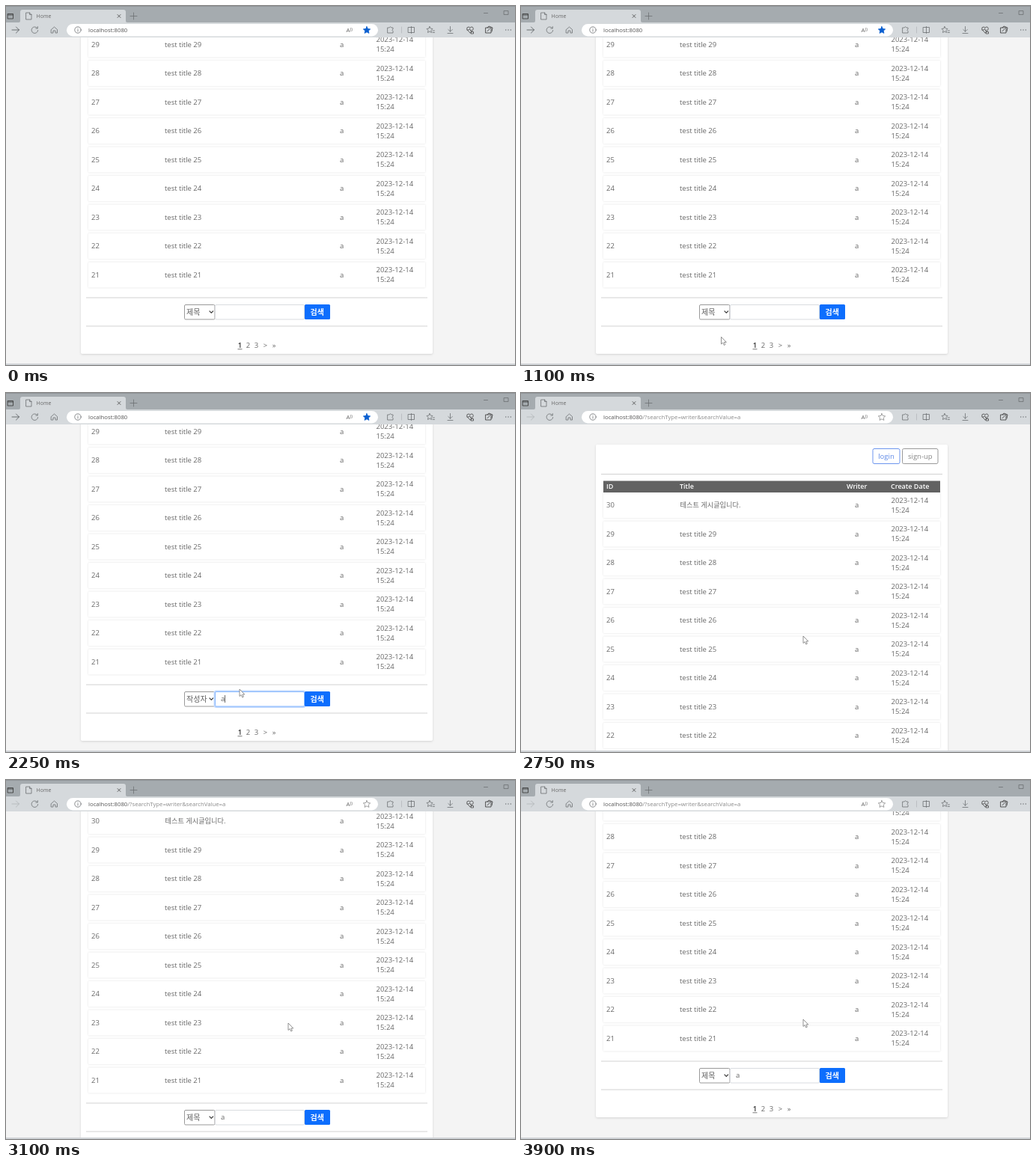
Recreate the animation shown at these times as an HTML page. Size 680x480 px, loop 4000 ms.

```html
<!DOCTYPE html>
<html lang="ko">
<head>
<meta charset="utf-8">
<title>Board search</title>
<style>
html, body { margin: 0; width: 100%; height: 100%; overflow: hidden; background: #f4f4f4; }
svg { display: block; }
text { font: 9.5px "Open Sans", "Noto Sans CJK KR", "Noto Sans CJK", sans-serif; fill: #686868; white-space: pre; }
.ko { font-size: 9.2px; }
.ui { font-size: 10px; fill: #5c5c5c; }
.head { font-size: 9px; font-weight: 600; fill: #fff; }
.url { font-size: 7.75px; fill: #8a8a8a; }
.rule { stroke: #d2d2d2; }
.card { fill: #fff; filter: drop-shadow(0 1px 1.5px rgba(0,0,0,.13)); }
.row { fill: #fff; filter: drop-shadow(0 .8px 1px rgba(0,0,0,.13)); }
.icon { fill: none; stroke: #6c7073; stroke-width: .8; stroke-linejoin: round; stroke-linecap: round; }
</style>
</head>
<body>
<svg id="stage" width="680" height="480" viewBox="0 0 680 480">
  <rect width="680" height="480" fill="#f4f4f4"/>
  <g id="page">
    <rect class="card" x="100" y="69" width="470" height="533" rx="2"/>
    <g fill="#fff">
      <rect x="470" y="74.5" width="36" height="20" rx="2" stroke="#6c95ee"/>
      <rect x="509.5" y="74.5" width="47.5" height="20" rx="2" stroke="#999"/>
    </g>
    <text x="488" y="87.5" text-anchor="middle" style="fill:#5b87e6">login</text>
    <text x="533.3" y="87.5" text-anchor="middle" style="fill:#858585">sign-up</text>
    <path class="rule" d="M107 108.5H563M107 527H563M107 565H563"/>
    <g id="rows"></g>
    <rect x="110" y="117.5" width="450" height="15.5" fill="#626262"/>
    <text class="head" x="114" y="128">ID</text>
    <text class="head" x="212" y="128">Title</text>
    <text class="head" x="435" y="128">Writer</text>
    <text class="head" x="494" y="128">Create Date</text>

    <rect x="238.5" y="536.5" width="40.5" height="19.5" rx="1.5" fill="#fff" stroke="#999"/>
    <text class="ui" id="kind" x="241" y="549.6"></text>
    <path class="icon" d="M272 545l2.3 2.3 2.3-2.3" style="stroke:#444;stroke-width:1.2"/>
    <rect id="glow" x="279" y="536" width="120" height="20.5" rx="2" fill="none" stroke="#c2d9fd" stroke-width="3"/>
    <rect id="box" x="279.5" y="536.5" width="119" height="19.5" rx="1.5" fill="#fff"/>
    <text id="value" x="287" y="549.4"></text>
    <path id="caret" d="M0 541V551" stroke="#444" stroke-width=".8"/>
    <rect x="399" y="536" width="34" height="20" rx="1.5" fill="#0d6efd"/>
    <text class="ui" x="415.8" y="549.6" text-anchor="middle" style="fill:#fff;font-weight:700">검색</text>
    <g text-anchor="middle">
      <text x="312.5" y="594.4" style="font-weight:600;fill:#333">1</text>
      <path d="M309.5 595.8H315.5" stroke="#555" stroke-width=".8"/>
      <text x="323.5" y="594.4">2</text>
      <text x="334.5" y="594.4">3</text>
      <text x="346.5" y="594.4">&gt;</text>
      <text x="358" y="594.4">»</text>
    </g>
  </g>

  <rect width="680" height="22" fill="#a5abaf"/>
  <rect width="680" height=".8" fill="#8b9094"/>
  <rect y="22" width="680" height="20" fill="#d5d9dc"/>
  <path d="M17 22Q19 22 19 20V8Q19 5 22 5H157Q160 5 160 8V20Q160 22 162 22Z" fill="#d5d9dc"/>
  <rect x="81" y="24" width="416" height="16.5" rx="8.2" fill="#fff"/>
  <text x="40.5" y="15.8" style="font-size:7px">Home</text>
  <text class="url" x="110" y="34.8"><tspan fill="#555">localhost:8080</tspan><tspan id="query"></tspan></text>
  <text x="454.5" y="35" style="font-size:8px">A<tspan dy="-2" style="font-size:6px">))</tspan></text>
  <g class="icon">
    <path d="M2.5 10.5H9.5V17H2.5ZM2.5 12H9.5" style="stroke:#333"/>
    <path d="M27 9H31.5L34 11.5V18H27ZM31.5 9V11.5H34"/>
    <path d="M149 11.5l4 4M153 11.5l-4 4" style="stroke:#444"/>
    <path d="M166 13.5h9M170.5 9v9M638.5 9.5h5M665.5 6.5h5.5v5h-5.5Z"/>
    <path id="forward" d="M8 32H17.5M13.5 28l4 4-4 4"/>
    <path d="M41.8 29.5A4.3 4.3 0 1 0 42.7 32.5M42.3 27.5V30H39.8"/>
    <path d="M60.5 31.5L64.5 28L68.5 31.5V36H66V33H63V36H60.5Z"/>
    <circle cx="96" cy="32" r="4.2"/><path d="M96 31.5V34M96 29.9V30"/>
    <path id="star" d="M482 27.5L483.4 30.5 486.7 30.9 484.3 33.1 484.9 36.4 482 34.8 479.1 36.4 479.7 33.1 477.3 30.9 480.6 30.5Z"/>
    <path d="M510 29H512Q513.5 26.5 515 29H517V31Q514.5 32 517 33.5V36H510Z"/>
    <path d="M528.5 28V36" style="stroke:#b4b8bb"/>
    <path d="M537.5 28.5H545.5V35.5H537.5ZM541.5 27.5V36.5"/>
    <path d="M566 27.5L567.3 30 570 30.5 568 32.5 568.4 35.5 566 34 563.5 35.5 564 32.5 562 30.5 564.7 30ZM570 33h2.5M570 35.5h2.5"/>
    <path d="M593.5 27.5V34M590.8 31.5l2.7 2.7 2.7-2.7M590 36.5h7"/>
    <path d="M620 36L615.8 31.5Q615 28 618 28 619.5 28 620 29.5 620.5 28 622 28 625 28 624 31.5ZM616 32h2.5l1-1.5 1.5 3 1-1.5M621.5 34.5h3v2.5h-3Z" style="stroke:#444"/>
    <path d="M641 29H648V36H641ZM643 29L645 27 650 29 649 34M643 33.5l3-2.5" style="stroke:#333"/>
    <path d="M667.7 32h.1M671 32h.1M674.3 32h.1" style="stroke-width:1.3"/>
  </g>
  <rect y="478" width="680" height="2" fill="#d0d3d7"/>
  <path id="cursor" d="M0 0V9.5L2.2 7.6 3.8 11 5.4 10.2 3.9 7H6.8Z" fill="#fff" stroke="#777" stroke-width=".8"/>
</svg>
<script>
const $ = id => document.getElementById(id);
const clamp = u => Math.max(0, Math.min(1, u));
const text = (x, y, s, cls = '') => `<text class="${cls}" x="${x}" y="${y}">${s}</text>`;

let rows = '';
for (let i = 0; i < 10; i++) {
  const id = 30 - i, y = 150 + 38.5 * i, base = y + 3.4;
  rows += `<rect class="row" x="110" y="${y - 17}" width="450" height="34" rx="1"/>`
    + text(114, base, id)
    + (i ? text(212, base, 'test title ' + id) : text(212.5, base, '테스트 게시글입니다.', 'ko'))
    + text(446, base, 'a')
    + text(494.5, y - 3.1, '2023-12-14') + text(494.5, y + 9.6, '15:24');
}
$('rows').innerHTML = rows;

const PICK = 1300, FOCUS = 1350, TYPE = 1500, LOAD = 2300;

function cursorAt(t) {
  if (t < PICK) return [267.5, 442.5];
  const u = clamp((t - LOAD) / 300), e = u * u * (3 - 2 * u);
  const lift = 5 * clamp((t - 3550) / 200);
  return [312 + 65 * e, 396 - 71 * e - lift];
}

function draw(t) {
  const loaded = t >= LOAD, focus = t >= FOCUS && !loaded, typed = t >= TYPE;
  const scroll = loaded ? 151 * (1 - (1 - clamp((t - 3000) / 215)) ** 1.585) : 137;
  $('page').setAttribute('transform', `translate(0 ${-scroll})`);
  $('kind').textContent = t >= PICK && !loaded ? '작성자' : '제목';
  $('value').textContent = typed ? 'a' : '';
  $('glow').style.display = $('caret').style.display = focus ? '' : 'none';
  $('box').setAttribute('stroke', focus ? '#86b7fe' : '#d9dce0');
  $('caret').setAttribute('transform', `translate(${typed ? 292.5 : 287} 0)`);
  $('query').textContent = loaded ? '/?searchType=writer&searchValue=a' : '';
  $('forward').style.stroke = loaded ? '#b0b4b7' : '#505457';
  $('star').style.fill = loaded ? 'none' : '#0b5fd0';
  $('star').style.stroke = loaded ? '#888' : '#0b5fd0';
  $('cursor').style.display = t < 200 ? 'none' : '';
  $('cursor').setAttribute('transform', `translate(${cursorAt(t)})`);
}

function tick() {
  draw(Math.floor(performance.now() % 4000 / 50) * 50);
  requestAnimationFrame(tick);
}
tick();
</script>
</body>
</html>
```
